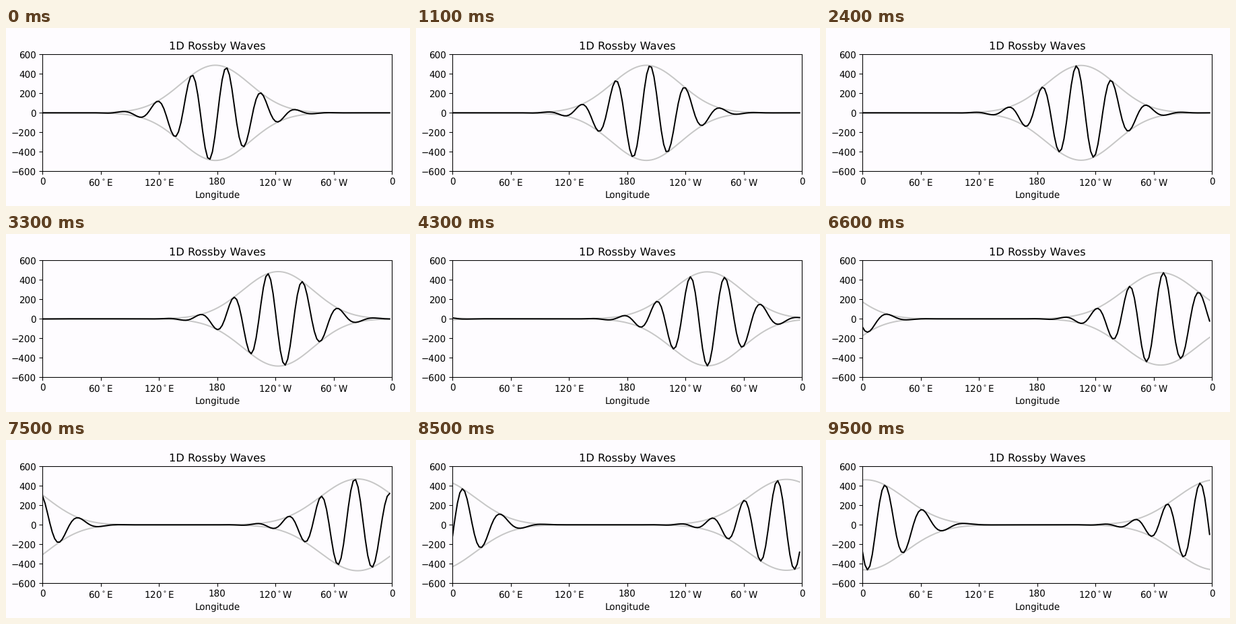
Recreate the animation shown at these times as a matplotlib script. Size 600x265 px, loop 9600 ms.

```python
import numpy as np
import matplotlib.pyplot as plt
from matplotlib.animation import FuncAnimation

WIDTH, HEIGHT, DPI = 600, 265, 96
FRAMES, INTERVAL = 96, 100
PAPER = "#fefcff"

# Periodic grid in degrees of longitude
N = 144
DX = 360 / N
lon = np.arange(N) * DX

# Wave packet at the start: carrier wavenumber, centre, width, height
K0, CREST = 10, 189.5
CENTRE, SPREAD, PEAK = 178.0, 35.6, 489

# Mean wind (degrees per frame) and beta effect
WIND, BETA = 1.7225, 37.4

k = np.fft.fftfreq(N, 1 / N)
k_safe = np.where(k == 0, 1, k)
dx = np.radians(DX)
# Centred-difference advection plus the Rossby term
omega = np.radians(WIND * np.sin(k * dx) / dx - np.where(k == 0, 0, BETA / k_safe))

bump = PEAK * np.exp(-((lon - CENTRE) ** 2) / (2 * SPREAD**2))
spectrum = np.fft.fft(bump * np.exp(1j * K0 * np.radians(lon - CREST)))


def packet(t):
    """Complex wave packet after t frames: real part is the wave."""
    return np.fft.ifft(spectrum * np.exp(-1j * omega * t))


plt.rcParams.update({"font.family": "DejaVu Sans", "text.hinting": "none"})
fig = plt.figure(figsize=(WIDTH / DPI, HEIGHT / DPI), dpi=DPI, facecolor=PAPER)
ax = fig.add_axes(
    [54.3 / WIDTH, 51.7 / HEIGHT, 519 / WIDTH, 174 / HEIGHT], facecolor=PAPER
)
ax.set_title("1D Rossby Waves", fontsize=12.2)
ax.set_xlabel("Longitude", fontsize=10.15)
ax.tick_params(labelsize=10.15)
ax.set_xlim(0, 360)
ax.set_ylim(-600, 600)
ax.set_yticks(range(-600, 601, 200))
ax.set_xticks(
    range(0, 361, 60),
    ["0", r"60$^\circ$E", r"120$^\circ$E", "180", r"120$^\circ$W", r"60$^\circ$W", "0"],
)

upper, = ax.plot(lon, bump, color="0.78", lw=1.5)
lower, = ax.plot(lon, -bump, color="0.78", lw=1.5)
wave, = ax.plot(lon, bump, color="black", lw=1.5)


def update(t):
    z = packet(t)
    envelope = np.abs(z)
    upper.set_ydata(envelope)
    lower.set_ydata(-envelope)
    wave.set_ydata(z.real)
    return upper, lower, wave


anim = FuncAnimation(
    fig, update, frames=FRAMES, interval=INTERVAL, repeat=True, repeat_delay=0
)
plt.show()
```
